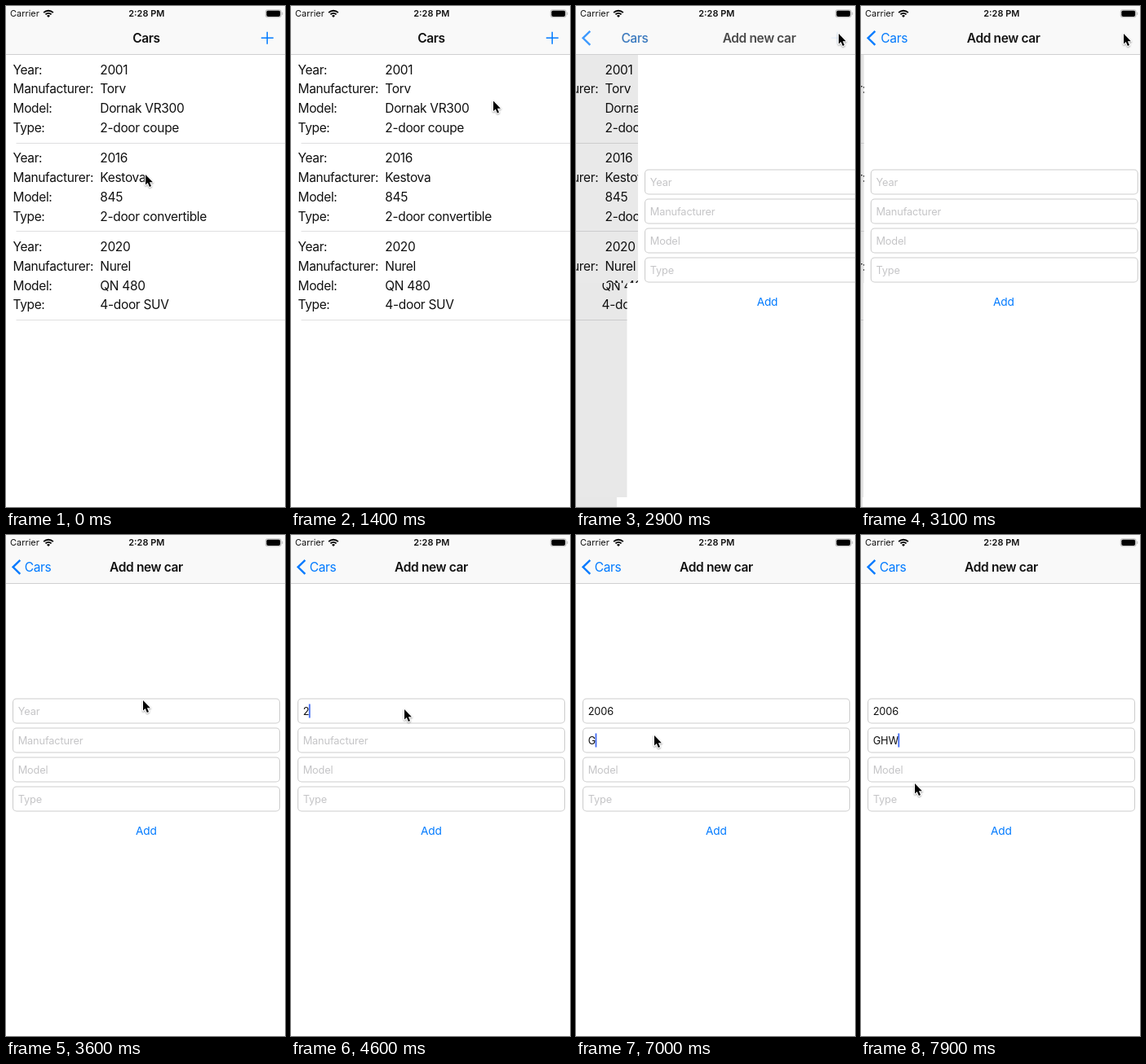
Recreate the animation shown at these times as an HTML page with a canvas. Size 342 by 615 pixels, loop 8 s.

```html
<!DOCTYPE html>
<html lang="en">
<head>
<meta charset="utf-8">
<title>Cars</title>
<style>
html, body { margin: 0; width: 100%; height: 100%; overflow: hidden; background: #fff; }
canvas { display: block; width: 342px; height: 615px; }
</style>
</head>
<body>
<canvas></canvas>
<script>
const W = 342, H = 615, NAV = 60, LOOP = 8000, STEP = 100;
const BLUE = '#007aff', INK = '#111';
const canvas = document.querySelector('canvas');
const ctx = canvas.getContext('2d');
const dpr = window.devicePixelRatio || 1;
canvas.width = W * dpr;
canvas.height = H * dpr;

const labels = ['Year:', 'Manufacturer:', 'Model:', 'Type:'];
const cars = [
  ['2001', 'Torv', 'Dornak VR300', '2-door coupe'],
  ['2016', 'Kestova', '845', '2-door convertible'],
  ['2020', 'Nurel', 'QN 480', '4-door SUV']
];
const fields = [
  { hint: 'Year', value: '2006', keys: [4600, 4800, 5100, 5300], focus: [4200, 5700] },
  { hint: 'Manufacturer', value: 'GHW', keys: [6900, 7200, 7400], focus: [6300, LOOP] },
  { hint: 'Model', value: '', keys: [], focus: [0, 0] },
  { hint: 'Type', value: '', keys: [], focus: [0, 0] }
];
// Pointer stops: time, x, y
const stops = [
  [0, 171, 207], [1100, 171, 207], [1700, 325, 26], [1800, 325, 26],
  [2100, 322, 35], [2200, 322, 35], [2300, 322, 34], [3100, 322, 34],
  [3600, 168, 203], [4100, 139, 214], [5500, 139, 214], [6000, 95, 246],
  [6400, 95, 246], [6500, 96, 246], [7700, 96, 246], [7900, 66, 305], [LOOP, 66, 305]
];

function text(s, x, y, size, color, { weight = 400, gap = 0, align = 'left' } = {}) {
  ctx.font = `${weight} ${size}px Inter, Roboto, sans-serif`;
  ctx.letterSpacing = gap + 'px';
  ctx.textAlign = align;
  ctx.fillStyle = color;
  ctx.fillText(s, x, y);
  return ctx.measureText(s).width;
}

function rect(x, y, w, h, color) {
  ctx.fillStyle = color;
  ctx.fillRect(x, y, w, h);
}

function roundRect(x, y, w, h, r) {
  ctx.beginPath();
  ctx.roundRect(x, y, w, h, r);
}

function line(points, color, width) {
  ctx.beginPath();
  points.forEach(p => ctx.lineTo(...p));
  ctx.strokeStyle = color;
  ctx.lineWidth = width;
  ctx.stroke();
}

function faded(alpha, draw) {
  if (alpha <= 0) return;
  ctx.save();
  ctx.globalAlpha = alpha;
  draw();
  ctx.restore();
}

// Critically damped spring: share of the push still to go
function remaining(t) {
  const u = Math.max(0, t - 2745) * 0.0184;
  const r = (1 + u) * Math.exp(-u);
  return r < 0.002 ? 0 : r;
}

function drawList() {
  cars.forEach((car, i) => {
    const top = 83.6 + i * 108.8;
    car.forEach((value, j) => {
      const y = top + j * 23.7;
      text(labels[j], 8.5, y, 15.5, INK, { gap: -0.36 });
      text(value, 115.3, y, 15.5, INK, { gap: -0.33 });
    });
    rect(12.5, Math.round(167.5 + i * 108.8), W, 1, '#dfdfe0');
  });
}

function drawForm(t) {
  fields.forEach((f, i) => {
    const y = 201 + i * 36;
    roundRect(8.5, y, 327, 30, 4.5);
    ctx.fillStyle = '#fff';
    ctx.fill();
    ctx.strokeStyle = '#cecece';
    ctx.lineWidth = 1.1;
    ctx.stroke();
    const typed = f.value.slice(0, f.keys.filter(k => t >= k).length);
    const width = text(typed || f.hint, 14.7, y + 19.5, 12.77, typed ? INK : '#c5c5c7', { gap: -0.14 });
    if (t >= f.focus[0] && t < f.focus[1])
      rect(14.2 + (typed ? width : 0), y + 6.5, 1.8, 17, '#426bf2');
  });
  text('Add', 171.8, 368.3, 13.68, BLUE, { gap: -0.22, align: 'center' });
}

function drawPages(t, r) {
  const x = W * r;
  if (r > 0) {
    ctx.save();
    ctx.translate((x - W) * 0.3, 0);
    drawList();
    ctx.restore();
    rect(0, NAV, x, H, `rgba(0,0,0,${0.11 * (1 - r)})`);
  }
  if (r < 1) {
    rect(x, NAV, W, H, '#fff');
    ctx.save();
    ctx.translate(x, 0);
    drawForm(t);
    ctx.restore();
  }
}

// Lower parts of the screen are refreshed slightly later during the push
function drawBands(t) {
  [[NAV, 340, 0], [340, 603, 14], [603, H, 30]].forEach(([top, bottom, lag]) => {
    ctx.save();
    ctx.beginPath();
    ctx.rect(0, top, W, bottom - top);
    ctx.clip();
    drawPages(t, remaining(t + lag));
    ctx.restore();
  });
}

function drawStatus() {
  text('Carrier', 5, 13.4, 10.94, INK);
  text('2:28 PM', 172.3, 13.4, 10.94, INK, { weight: 600, align: 'center' });
  [[0, 2.8], [4.1, 6], [7.3, 9.2]].forEach(([inner, outer]) => {
    ctx.beginPath();
    ctx.arc(52, 14, outer, -Math.PI * 0.75, -Math.PI * 0.25);
    ctx.arc(52, 14, inner, -Math.PI * 0.25, -Math.PI * 0.75, true);
    ctx.fillStyle = '#000';
    ctx.fill();
  });
  roundRect(317.8, 4.3, 19.8, 10, 2.8);
  ctx.fillStyle = '#c4c4c4';
  ctx.fill();
  roundRect(338, 7.6, 1.3, 3.4, 0.6);
  ctx.fill();
  roundRect(319.4, 5.7, 16.7, 7.2, 1.8);
  ctx.fillStyle = '#000';
  ctx.fill();
}

function drawNav(t) {
  rect(0, 0, W, NAV, '#f9f9f9');
  rect(0, NAV - 1, W, 1, '#d0d0d1');
  drawStatus();
  const r = remaining(t - 8); // the bar trails the pages a little
  const title = { weight: 600, gap: -0.37, align: 'center' };
  const carsX = 39 + 133 * r;
  faded(1 - r, () => {
    text('Cars', carsX, 44.6, 15.5, BLUE, { gap: -0.36, align: 'center' });
    line([[17.3, 30.8], [8.6, 39.3], [17.3, 47.8]], BLUE, 2.4);
    text('Add new car', 172 + 212 * r, 44.6, 15.5, INK, title);
  });
  faded(r, () => text('Cars', carsX, 44.6, 15.5, INK, title));
  faded(t < 2600 ? 1 : 0.25 * r, () => {
    line([[312.8, 39.2], [327.8, 39.2]], BLUE, 1.5);
    line([[320.2, 31.7], [320.2, 46.7]], BLUE, 1.5);
  });
}

function drawPointer(t) {
  const i = stops.findIndex(s => s[0] > t);
  const [t0, x0, y0] = stops[i - 1], [t1, x1, y1] = stops[i];
  const p = (t - t0) / (t1 - t0), e = p * p * (3 - 2 * p);
  ctx.save();
  ctx.translate(x0 + (x1 - x0) * e, y0 + (y1 - y0) * e);
  ctx.beginPath();
  [[0, 0], [0, 12.6], [2.8, 10], [4.9, 14.9], [7, 14], [4.9, 9.2], [8.9, 9.2]]
    .forEach(q => ctx.lineTo(...q));
  ctx.closePath();
  ctx.lineJoin = 'round';
  ctx.strokeStyle = '#fff';
  ctx.lineWidth = 2.2;
  ctx.shadowColor = 'rgba(0,0,0,.35)';
  ctx.shadowBlur = 2 * dpr;
  ctx.shadowOffsetY = dpr;
  ctx.stroke();
  ctx.shadowColor = 'transparent';
  ctx.fillStyle = '#000';
  ctx.fill();
  ctx.restore();
}

const start = performance.now();
function frame() {
  const elapsed = Math.max(0, performance.now() - start) % LOOP;
  const t = Math.floor(elapsed / STEP) * STEP;
  ctx.setTransform(dpr, 0, 0, dpr, 0, 0);
  rect(0, 0, W, H, '#fff');
  drawBands(t);
  drawNav(t);
  drawPointer(t);
  requestAnimationFrame(frame);
}
frame();
</script>
</body>
</html>
```
